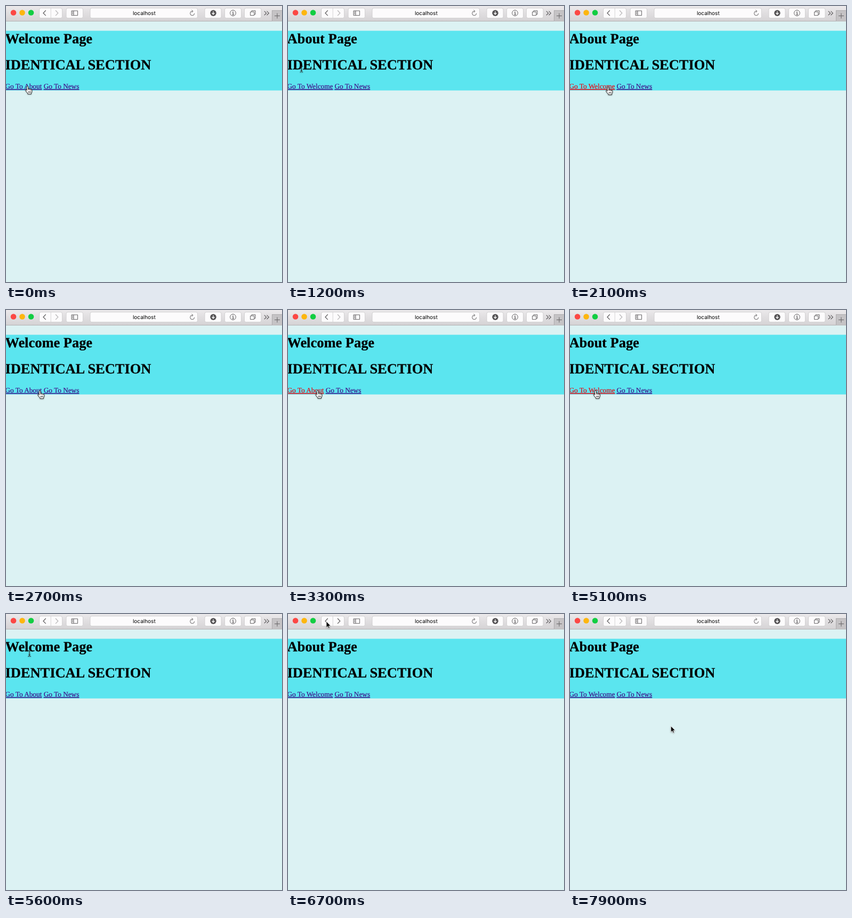
An HTML page that plays this animation: 518 by 518 pixels, repeating every 8000 ms.

```html
<!DOCTYPE html>
<html lang="en">
<head>
<meta charset="utf-8">
<title>Page navigation</title>
<style>
html, body { margin: 0; width: 100%; height: 100%; overflow: hidden; background: #dcf2f3; }
svg { display: block; width: 100%; height: 100%; }
.serif { font-family: "Liberation Serif", "Times New Roman", serif; text-rendering: geometricPrecision; }
.h1 { font-weight: bold; font-size: 26.45px; stroke: #000; stroke-width: .25; }
.link { font-size: 13.25px; fill: #3f0f88; stroke: #3f0f88; stroke-width: .2; text-decoration: underline; }
.link.active { fill: #ea0812; stroke: #ea0812; }
.url { font: 10px Inter, "Liberation Sans", sans-serif; text-anchor: middle; text-rendering: geometricPrecision; }
.btn { fill: #fcfbfc; stroke: #cbc9cb; stroke-width: .8; }
.icon { fill: none; stroke: #636163; stroke-width: 1; }
.icon.bold { stroke-width: 1.3; }
#cursor { filter: drop-shadow(0 1px .8px #0005); }
</style>
</head>
<body>
<svg viewBox="0 0 518 518">
  <defs>
    <linearGradient id="bar" x2="0" y2="1">
      <stop stop-color="#ebe9eb"/><stop offset="1" stop-color="#d5d3d5"/>
    </linearGradient>
  </defs>
  <rect width="518" height="518" fill="#dcf2f3"/>
  <rect y="46.5" width="518" height="112" fill="#5be5ef"/>

  <rect width="518" height="28" fill="url(#bar)"/>
  <rect y="28" width="518" height="1" fill="#b3b1b3"/>
  <rect x="499" y="8" width="19" height="20.5" fill="#c5c3c5"/>
  <path d="M499.5 8.5V28M499 8.5H518" fill="none" stroke="#aeacae"/>
  <path class="icon" d="M509 13.5V23.5M504 18.5H514"/>

  <circle cx="14" cy="12.5" r="5.3" fill="#fc4744"/>
  <circle cx="30.5" cy="12.5" r="5.3" fill="#fdb60e"/>
  <circle cx="47" cy="12.5" r="5.3" fill="#12ce42"/>

  <g id="buttons"></g>
  <path d="M84.2 4V23" stroke="#d2d0d2" stroke-width=".9"/>
  <path class="icon bold" d="M74.7 8.3L70 13.2L74.7 18.1"/>
  <path class="icon bold" id="forward" d="M93 8.3L97.7 13.2L93 18.1"/>
  <path class="icon" d="M123 9H134.5V17.7H123ZM127 9V17.7M124.3 11H126M124.3 13H126M124.3 15H126"/>
  <text class="url" x="259.3" y="17">localhost</text>
  <path class="icon" d="M350.5 9.8H349.6A4 4 0 1 0 353.6 13.8M348.6 7.4L351 9.8L348.6 12.2"/>
  <circle cx="389" cy="13.2" r="5.7" fill="#555355"/>
  <path d="M389 10V15.5M386.5 13.3L389 15.9L391.5 13.3" fill="none" stroke="#fff" stroke-width="1.3"/>
  <circle class="icon" cx="426" cy="13.2" r="5.4"/>
  <path class="icon bold" d="M426 9.7V11M424.8 12.4H426.3V16.3M424.5 16.3H427.7"/>
  <path class="icon" d="M461 11V8.8H468V15.5H465.8M458.6 11H465.8V17.7H458.6Z"/>
  <path class="icon bold" d="M484.8 9.6L488.6 13.4L484.8 17.2M489.5 9.6L493.3 13.4L489.5 17.2"/>

  <g class="serif">
    <text class="h1" id="title" x="-1.6" y="70.3"></text>
    <text class="h1" x="-1.6" y="119.2">IDENTICAL SECTION</text>
    <text class="link" id="link0" x="-1.5" y="155"></text>
    <text class="link" id="link1" y="155"></text>
  </g>

  <g id="cursor">
    <path id="arrow" d="M0 0V11.6L2.7 9.1L4.4 13L6.3 12.2L4.6 8.4H8.2Z" stroke="#fff" stroke-width=".8"/>
    <path id="hand" fill="#fff" stroke="#111" stroke-width=".9" stroke-linejoin="round"
      d="M-1.4 8.3V1.5Q-1.4 .2 0 .2T1.4 1.5V5.4Q2.7 4.5 3.7 5.8Q5 5 6 6.4Q8.3 5.9 8.3 8V10.4Q8 12 7 13.2V15H.4V13.6Q-1.6 11.6-3.6 8.6Q-4.4 7-3 6.7Q-2.1 6.8-1.4 8.3ZM1.4 5.4V7.6M3.7 6V8M6 6.5V8.4M1.8 10V12.6M3.7 10V12.6M5.6 10V12.6"/>
    <path id="beam" fill="none" stroke="#222" stroke-width="1"
      d="M-2.8-5.5Q0-5.5 0-4Q0-5.5 2.8-5.5M0-4V4M-2.8 5.5Q0 5.5 0 4Q0 5.5 2.8 5.5M-1.5 2H1.5"/>
  </g>
</svg>
<script>
const LOOP = 8000, STEP = 100;
const $ = id => document.getElementById(id);

// name, x of the second link
const PAGES = { Welcome: 70.8, About: 87.5, News: 87.5 };
const NAMES = Object.keys(PAGES);

// [time, page]
const visits = [
  [0, "Welcome"], [200, "About"], [2200, "Welcome"], [3400, "About"], [4300, "News"],
  [4700, "About"], [5200, "Welcome"], [6100, "About"], [7100, "Welcome"], [7300, "About"]
];
// [from, until, link index]
const presses = [
  [100, 200, 0], [2100, 2200, 0], [3300, 3400, 0], [4200, 4300, 1],
  [4500, 4700, 1], [5100, 5200, 0], [7000, 7100, 0], [7200, 7300, 0]
];
// [time, x, y, cursor shape from here on]
const moves = [
  [0, 40.4, 150.2, "hand"], [200, 40.4, 150.2, "arrow"], [400, 40.4, 150.2, "beam"],
  [900, 22, 116, "beam"], [1100, 22, 116, "beam"], [1700, 66, 150, "hand"],
  [2000, 71.5, 151.6, "hand"], [2200, 71.5, 151.6, "arrow"], [2400, 71.5, 151.6, "hand"],
  [3000, 55.5, 150.8, "hand"], [3400, 55.5, 150.8, "arrow"], [3500, 55.5, 150.8, "hand"],
  [4000, 111.5, 151, "hand"], [4300, 111.5, 151, "arrow"], [4400, 111.5, 151, "hand"],
  [4700, 111.5, 151, "arrow"], [4800, 111.5, 151, "hand"], [5100, 48, 151, "hand"],
  [5200, 48, 151, "arrow"], [5300, 48, 140, "beam"], [5600, 44, 74, "beam"],
  [5700, 50, 50, "arrow"], [6000, 72, 14, "arrow"], [6700, 72, 14, "arrow"],
  [6900, 40, 150, "hand"], [7100, 40, 150, "arrow"], [7200, 40, 150, "hand"],
  [7300, 40, 150, "arrow"], [7400, 40, 150, "arrow"], [7900, 189.3, 210.3, "arrow"]
];

$("buttons").innerHTML = [[62.5, 43], [113, 31.5], [158, 201.5], [373, 31], [410.5, 31], [447.5, 31.5]]
  .map(([x, w]) => `<rect class="btn" x="${x}" y="4" width="${w}" height="18.7" rx="3"/>`).join("");

const lastIndex = (list, t) => list.findLastIndex(item => item[0] <= t);

function drawPage(t) {
  const page = visits[lastIndex(visits, t)][1];
  const press = presses.find(([from, until]) => t >= from && t < until);
  $("title").textContent = page + " Page";
  NAMES.filter(name => name !== page).forEach((name, i) => {
    const link = $("link" + i);
    link.textContent = "Go To " + name;
    link.classList.toggle("active", !!press && press[2] === i);
  });
  $("link1").setAttribute("x", PAGES[page]);
  $("forward").style.stroke = t >= 6100 && t < 7100 ? "#636163" : "#b9b7b9";
}

function drawCursor(t) {
  const i = lastIndex(moves, t);
  const [t0, x0, y0, shape] = moves[i];
  const [t1, x1, y1] = moves[i + 1] || [LOOP, x0, y0];
  const u = (t - t0) / (t1 - t0), k = u * u * (3 - 2 * u);
  $("cursor").setAttribute("transform", `translate(${x0 + (x1 - x0) * k} ${y0 + (y1 - y0) * k})`);
  for (const id of ["arrow", "hand", "beam"]) $(id).style.display = id === shape ? "" : "none";
}

function render(now) {
  const t = Math.floor((now % LOOP) / STEP) * STEP;
  drawPage(t);
  drawCursor(t);
}

const start = performance.now();
function tick() {
  render(performance.now() - start);
  requestAnimationFrame(tick);
}
tick();
</script>
</body>
</html>
```
